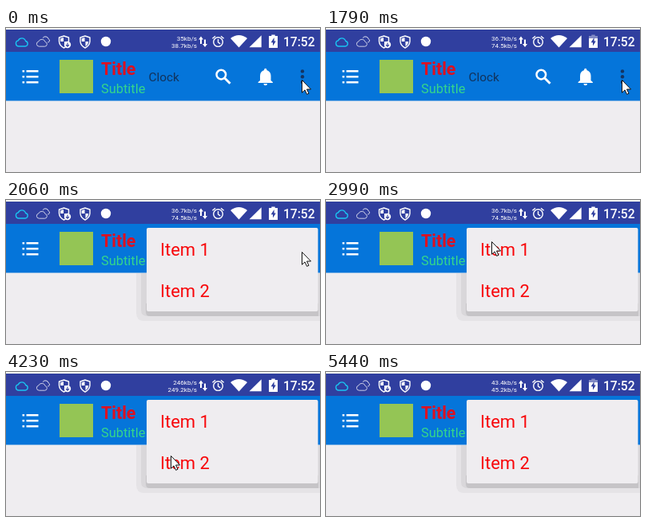
Animation of 393x181 px, one loop 5580 ms. Source, as an HTML page:

```html
<!DOCTYPE html>
<html lang="en">
<head>
<meta charset="utf-8">
<title>Toolbar overflow menu</title>
<style>
  html, body { margin: 0; width: 100%; height: 100%; overflow: hidden; background: #efedf0; }
  svg { display: block; width: 393px; height: 181px; font-family: Roboto, "Noto Sans", sans-serif; }
  .line { fill: none; stroke: #fff; stroke-width: 1.4; stroke-linejoin: round; }
  .speed { font-size: 8.1px; text-anchor: end; }
  .item { font-size: 22px; fill: #f80509; }
</style>
</head>
<body>
<svg viewBox="0 0 393 181">
  <defs>
    <path id="cloud" d="M4 11H12a3.3 3.3 0 0 0 .6-6.5 5 5 0 0 0-9.4-.6A3.6 3.6 0 0 0 4 11Z"/>
    <g id="shield">
      <path class="line" d="M7 1 13 3V8Q12.5 13.5 7 16 1.5 13.5 1 8V3Z"/>
      <path d="M6.5 3 2.7 4.3V8H6.5ZM7.5 8H11.2Q10.8 12 7.5 14Z"/>
    </g>
  </defs>

  <rect width="393" height="181" fill="#efedf0"/>
  <rect width="393" height="2" fill="#f4f6f0"/>
  <rect y="2" width="393" height="28" fill="#303f9f"/>
  <rect y="30" width="393" height="61.5" fill="#0575da"/>

  <!-- status bar -->
  <g fill="#fff">
    <use href="#cloud" class="line" style="stroke:#19c5f3" x="12" y="12"/>
    <g class="line" style="stroke-width:1" opacity=".85">
      <use href="#cloud" transform="translate(38 13.5) scale(.88)"/>
      <path d="M46 12.6a4 4 0 0 1 7.2 1.2 2.2 2.2 0 0 1-1 4.2"/>
    </g>
    <use href="#shield" x="65.5" y="9"/>
    <circle cx="77" cy="21" r="4.2"/>
    <path d="M77 18.6V23M75 21.2 77 23.2 79 21.2" fill="none" stroke="#303f9f" stroke-width="1.1"/>
    <use href="#shield" x="92" y="9"/>
    <circle cx="125" cy="17" r="6.2"/>
    <text id="down" class="speed" x="239" y="16"></text>
    <text id="up" class="speed" x="239" y="25"></text>
    <path d="M244 10.5 247 14.5H245V20H243V14.5H241ZM249 24 246 20H248V14.5H250V20H252Z"/>
    <g class="line">
      <circle cx="265.5" cy="17.6" r="5.8"/>
      <path d="M265.5 14V18L268.2 19.8M258.4 13.2 262 10.2M269 10.2 272.6 13.2"/>
    </g>
    <path d="M281 13Q291.5 5.2 302 13L291.5 24.5Z"/>
    <path d="M304.5 24.3H319.7V9.2Z"/>
    <path d="M329 13H340V25H329Z"/>
    <path id="batteryTop" d="M332.3 8.5H336.7V10H340V13H329V10H332.3Z"/>
    <path d="M335.6 12 331.6 18.2H334V22.5L337.8 16.4H335.6Z" fill="#303f9f"/>
    <text x="347" y="23" font-size="15.6" font-weight="500">17:52</text>
  </g>

  <!-- toolbar -->
  <g id="list" fill="#fff"></g>
  <rect x="67" y="40" width="42" height="42" fill="#94c555"/>
  <text x="119" y="58.6" font-size="21.4" font-weight="700" fill="#df1020">Title</text>
  <text x="119" y="81.7" font-size="16.4" fill="#35d58b">Subtitle</text>
  <text x="178.5" y="67" font-size="15.4" fill="#12335c">Clock</text>
  <circle cx="269.3" cy="58.6" r="5.8" fill="none" stroke="#fff" stroke-width="2.5"/>
  <path d="M273.5 62.8 280.5 69.8" stroke="#fff" stroke-width="3"/>
  <path fill="#fff" d="M324.7 72.3a2.3 2.3 0 0 0 2.3-2.2H322.4a2.3 2.3 0 0 0 2.3 2.2ZM331.5 66V60.2C331.5 56.6 329.4 53.9 326.3 53.1V52.3a1.6 1.6 0 0 0-3.2 0V53.1C320 53.9 318 56.6 318 60.2V66L315.6 68V69.1H333.9V68Z"/>
  <g id="dots" fill="#143462"></g>

  <!-- overflow menu -->
  <g id="menu">
    <path d="M393 92H163V142Q163 152 173 152H393Z" fill="#e5e3e6"/>
    <path d="M393 92H169V138Q169 146 177 146H393Z" fill="#d9d7da"/>
    <path d="M175 130H391V146H180Q175 146 175 141Z" fill="#c6c4c7"/>
    <rect x="176" y="35" width="214.5" height="105" rx="2" fill="#efedf0"/>
    <text class="item" x="193" y="69.7">Item 1</text>
    <text class="item" x="193" y="122">Item 2</text>
  </g>

  <path id="cursor" d="M.5 .5V16.2L4.1 12.9 6.6 18.4 9 17.3 6.5 12H11.6Z" fill="#fff" stroke="#111"/>
</svg>
<script>
  const LOOP = 5580, TICK = 135;
  const $ = id => document.getElementById(id);

  // Turning points of the pointer: time, x, y.
  const route = [
    [2180, 370, 65], [2840, 224, 43], [2990, 207, 52], [3110, 201, 67],
    [3350, 212, 98], [3500, 241, 105], [3650, 261, 89], [3800, 246, 60],
    [4070, 210, 65], [4230, 206, 105], [4380, 244, 130], [4530, 274, 127],
    [5040, 380, 192]
  ];
  const speeds = ["35kb/s 38.7kb/s", "36.7kb/s 74.5kb/s", "246kb/s 249.2kb/s", "43.4kb/s 45.2kb/s"];

  // Progress from a to b, held between jumps about one TICK apart.
  function stepped(t, a, b) {
    const n = Math.round((b - a) / TICK);
    const p = Math.min(1, Math.max(0, (t - a) / (b - a)));
    return Math.floor(p * n) / n;
  }

  function pointer(t) {
    const next = route.findIndex(k => k[0] > t);
    if (next === 0) return route[0].slice(1);
    if (next < 0) return route.at(-1).slice(1);
    const [a, ax, ay] = route[next - 1], [b, bx, by] = route[next];
    const p = stepped(t, a, b);
    return [ax + (bx - ax) * p, ay + (by - ay) * p];
  }

  function draw(t) {
    $("cursor").setAttribute("transform", `translate(${pointer(t)})`);

    const [down, up] = speeds[Math.floor((t + 630) / 1930)].split(" ");
    $("down").textContent = down;
    $("up").textContent = up;

    const charging = (t + 620) % 1000 < 580;
    $("batteryTop").setAttribute("opacity", charging ? 0.4 : 1);

    const open = stepped(t, 1820, 2060);
    $("menu").setAttribute("opacity", open);
    $("menu").setAttribute("transform", `translate(391 35) scale(${0.9 + 0.1 * open}) translate(-391 -35)`);
  }

  for (let i = 0; i < 3; i++) {
    const y = 53 + 7 * i;
    $("list").innerHTML += `<rect x="20.5" y="${y}" width="2.6" height="2.5"/><rect x="25.5" y="${y}" width="15" height="2.5"/>`;
    $("dots").innerHTML += `<circle cx="371" cy="${54.4 + 6.8 * i}" r="2.2"/>`;
  }

  const start = performance.now();
  function tick() {
    draw((performance.now() - start) % LOOP);
    requestAnimationFrame(tick);
  }
  tick();
</script>
</body>
</html>
```
